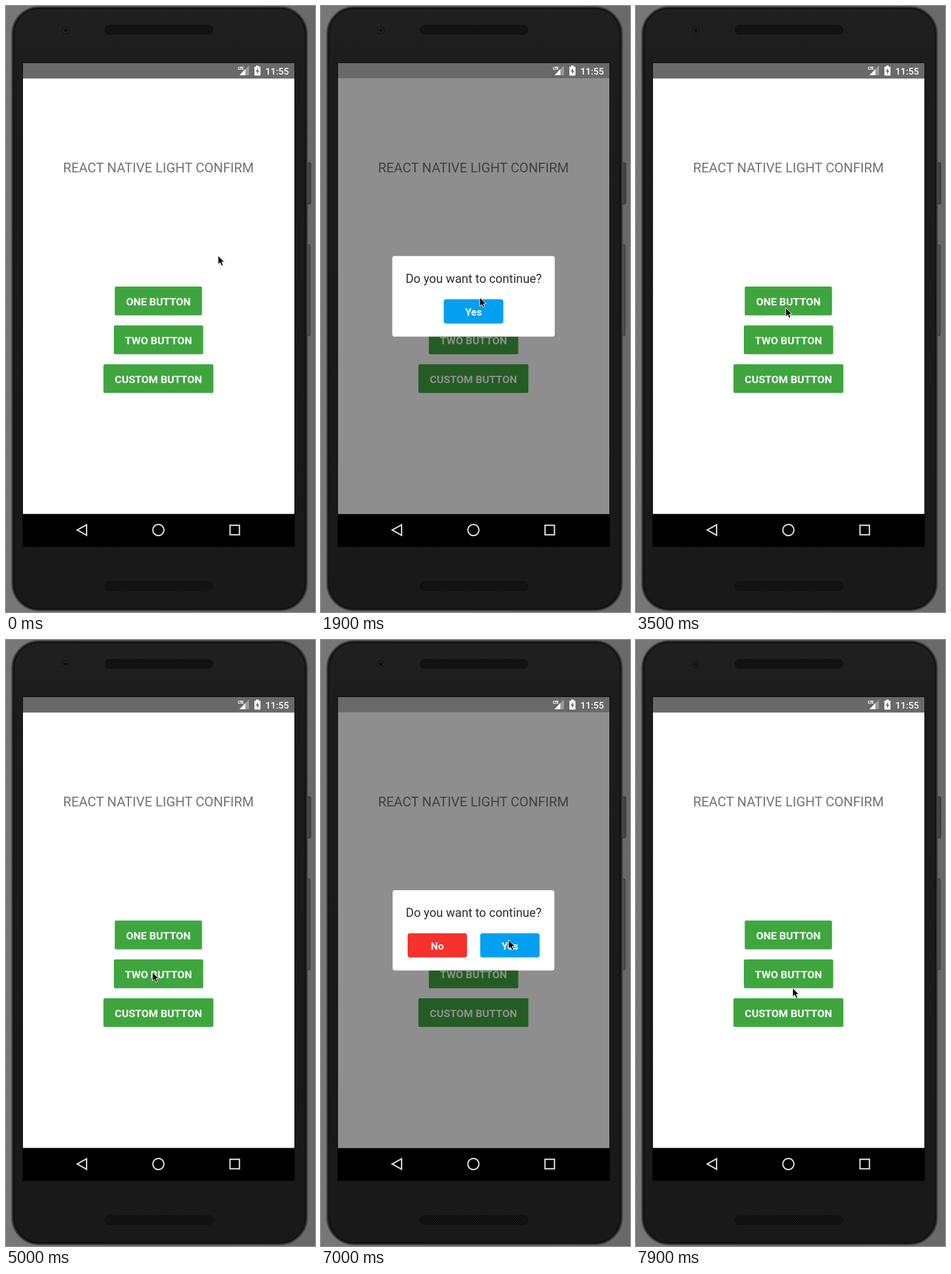
An HTML page that plays this animation: 510x998 px, repeating every 8000 ms.

```html
<!DOCTYPE html>
<html lang="en">
<head>
<meta charset="utf-8">
<title>Light confirm</title>
<style>
html, body { margin: 0; width: 100%; height: 100%; overflow: hidden; background: #6d6d6d; }
svg { display: block; width: 510px; height: 998px; }
text { font-family: Roboto, sans-serif; text-anchor: middle; }
.btn { fill: #3fa63f; }
.label { fill: #fff; font-size: 17.4px; font-weight: 700; }
.small { font-size: 16.8px; }
</style>
</head>
<body>
<svg viewBox="0 0 510 998">
  <defs>
    <linearGradient id="back"><stop stop-color="#777"/><stop offset="1" stop-color="#696969"/></linearGradient>
    <linearGradient id="shell" x2="0" y2="1">
      <stop stop-color="#202020"/><stop offset=".1" stop-color="#1c1c1c"/><stop offset="1" stop-color="#191919"/>
    </linearGradient>
    <pattern id="mesh" width="4" height="4" patternUnits="userSpaceOnUse">
      <rect width="4" height="4" fill="#0c0c0c"/>
      <circle cx="1" cy="1" r=".8" fill="#292929"/><circle cx="3" cy="3" r=".8" fill="#292929"/>
    </pattern>
    <clipPath id="page"><rect x="28" y="119.5" width="448" height="717"/></clipPath>
  </defs>

  <!-- phone -->
  <rect width="510" height="998" fill="url(#back)"/>
  <rect x="496" y="258" width="7" height="68" rx="2" fill="#444" stroke="#292929"/>
  <rect x="496" y="393" width="6" height="150" rx="2" fill="#505050" stroke="#303030"/>
  <rect x="9.5" y="1" width="488" height="995" rx="45" fill="#292929" stroke="#4a4a4a" stroke-width="1.5"/>
  <rect x="13" y="4" width="481" height="989" rx="42" fill="url(#shell)" stroke="#0b0b0b" stroke-width="1.5"/>
  <circle cx="98.5" cy="40" r="8" fill="#171717" stroke="#282828"/>
  <circle cx="98.5" cy="40" r="4" fill="#111" stroke="#333"/>
  <rect x="163.500" y="32" width="178" height="14.500" rx="7" fill="url(#mesh)" stroke="#0d0d0d"/>
  <rect x="163.500" y="948" width="178" height="14.500" rx="7" fill="url(#mesh)" stroke="#0d0d0d"/>
  <rect x="27" y="93" width="450" height="798" fill="#0a0a0a"/>

  <!-- status and navigation bars -->
  <rect x="28" y="94" width="448" height="26" fill="#696969"/>
  <path d="M401 98V114H385Z" fill="#9a9a9a"/>
  <path d="M395 104V114H385.500Z" fill="#fff"/>
  <text x="387.200" y="105" fill="#fff" font-size="8" font-weight="700" textLength="auto" style="font-family:'Roboto Condensed',Roboto,sans-serif;letter-spacing:-.8px">LTE</text>
  <path d="M410 100H413V98H417V100H420V114.500H410Z" fill="#fff"/>
  <path d="M415.800 102L412.300 108H414.500V112.500L418 106.500H415.800Z" fill="#696969"/>
  <text x="447.500" y="112.500" fill="#fff" font-size="15.300" font-weight="500">11:55</text>
  <rect x="28" y="836.500" width="448" height="53.500" fill="#000"/>
  <g fill="none" stroke="#dedede" stroke-width="2.200">
    <path d="M117.500 863L133 854.300V871.700Z"/>
    <circle cx="251.500" cy="863" r="9.200"/>
    <rect x="369.700" y="855.200" width="15.600" height="15.600"/>
  </g>

  <!-- page -->
  <g clip-path="url(#page)">
    <rect x="28" y="119" width="448" height="718" fill="#fff"/>
    <text x="251.700" y="273.500" fill="#737373" font-size="22">REACT NATIVE LIGHT CONFIRM</text>
    <g id="one">
      <rect class="btn" x="179.500" y="462" width="144" height="47.500" rx="2.500"/>
      <text class="label" x="251.500" y="493">ONE BUTTON</text>
    </g>
    <g id="two">
      <rect class="btn" x="178" y="526" width="147.500" height="47.500" rx="2.500"/>
      <text class="label" x="251.700" y="557">TWO BUTTON</text>
    </g>
    <rect class="btn" x="160.800" y="590" width="181.500" height="47.300" rx="2.500"/>
    <text class="label" x="251.500" y="621">CUSTOM BUTTON</text>

    <rect id="shade" x="28" y="119" width="448" height="718"/>
    <g id="dialog">
      <rect x="118.200" y="412" width="267" height="132.300" rx="4" fill="#fff"/>
      <text x="252" y="455.700" fill="#2d2d2d" font-size="20">Do you want to continue?</text>
      <g id="no">
        <rect x="143" y="483" width="98" height="39.700" rx="4" fill="#f5322e"/>
        <text class="label small" x="192" y="509.500">No</text>
      </g>
      <g id="yes">
        <rect x="262.800" y="483" width="98" height="39.700" rx="4" fill="#03a0ef"/>
        <text class="label small" x="311.800" y="509.500">Yes</text>
      </g>
    </g>
  </g>

  <g id="cursor">
    <path d="M1 1V16L4.500 13L7 18L9.500 17L7.300 12H12Z" fill="#000" opacity=".18"/>
    <path d="M0 0V14.500L3.300 11.500L5.700 16.800L8.300 15.700L6 10.600H10.500Z" stroke="#fff"/>
  </g>
</svg>
<script>
const LOOP = 8000, SECOND = 3800;
const $ = id => document.getElementById(id);
const linear = k => k;
const smooth = k => k * k * (3 - 2 * k);

// keys: [time, value] pairs, value held outside the range
function track(keys, t, ease = linear) {
  if (t <= keys[0][0]) return keys[0][1];
  for (let i = 1; i < keys.length; i++) {
    const [a, from] = keys[i - 1], [b, to] = keys[i];
    if (t < b) return from + (to - from) * ease((t - a) / (b - a));
  }
  return keys[keys.length - 1][1];
}

const path = [
  [100, 350, 411], [900, 262, 480], [1900, 262, 480], [2500, 247, 497], [3600, 247, 497],
  [4500, 241.5, 547], [5900, 241.5, 547], [6900, 309.5, 494], [7450, 309.5, 494], [7900, 258.5, 573]
];
const axis = n => path.map(p => [p[0], p[n]]);
const pathX = axis(1), pathY = axis(2);

const press = [[1380, 1], [1450, .2], [1550, .2], [1700, .82], [1750, 1]];
const tap = [[0, 1], [80, .3], [130, .3], [250, 1]];

// t counts from the moment the dialog opens, end is when it closes
function pose(t, end) {
  return {
    alpha: track([[0, 0], [20, .06], [120, .7], [190, 1], [end, 1], [end + 180, 0]], t),
    scale: track([[0, .9], [20, .906], [120, 1.055], [230, 1], [end, 1], [end + 180, .9]], t)
  };
}

function draw(t) {
  const second = t > 4500;
  const start = second ? 1680 + SECOND : 1680;
  const end = second ? 1870 : 1420;
  const { alpha, scale } = pose(t - start, end);

  $('one').setAttribute('opacity', track(press, t));
  $('two').setAttribute('opacity', track(press, t - SECOND));
  $('shade').setAttribute('opacity', .443 * alpha);
  $('dialog').setAttribute('opacity', alpha);
  $('dialog').setAttribute('transform', `translate(251.7 478) scale(${scale}) translate(-251.7 -478)`);
  $('no').setAttribute('visibility', second ? 'visible' : 'hidden');
  $('yes').setAttribute('transform', `translate(${second ? 0 : -60} 0)`);
  $('yes').setAttribute('opacity', track(tap, t - start - end + 200));
  $('cursor').setAttribute('transform', `translate(${track(pathX, t, smooth)} ${track(pathY, t, smooth)})`);
}

const begin = performance.now();
function tick() {
  draw((performance.now() - begin) % LOOP);
  requestAnimationFrame(tick);
}
tick();
</script>
</body>
</html>
```
